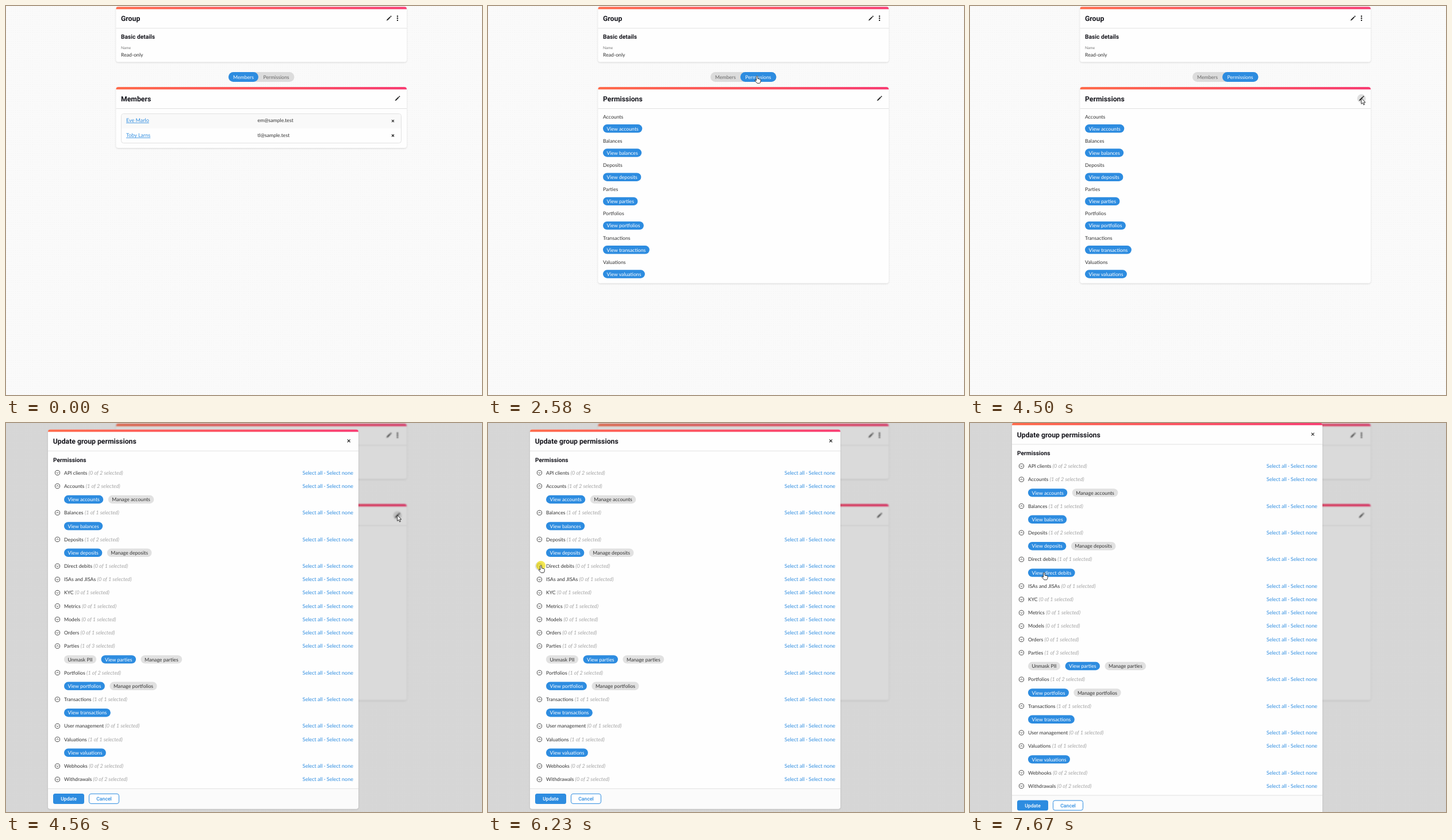
An HTML page with a canvas for the animation above (8000 ms loop, 828 by 677 pixels).

```html
<!DOCTYPE html>
<html lang="en">
<head>
<meta charset="utf-8">
<title>Group permissions</title>
<style>
html, body { margin: 0; width: 100%; height: 100%; overflow: hidden; background: #f9f9f9; }
canvas { display: block; }
</style>
</head>
<body>
<canvas id="stage" width="828" height="677"></canvas>
<script>
const W = 828, H = 677, LOOP = 8000;
const BLUE = '#2d8ce0', LINE = '#e1e1e1', INK = '#333', GREY = '#e1e1e1';
const BODY = '8.7px Lato, sans-serif';
const LINK = '9px Lato, sans-serif';
const COUNT = 'italic 9.1px Lato, sans-serif';
const TITLE = 'bold 12.25px Roboto, sans-serif';
const SUBTITLE = 'bold 10.25px Roboto, sans-serif';

const stage = document.getElementById('stage').getContext('2d');
const page = layer(), backdrop = layer();
let g = stage;

function layer() {
  const canvas = document.createElement('canvas');
  canvas.width = W;
  canvas.height = H;
  return canvas.getContext('2d');
}

for (const c of [stage, page]) c.textRendering = 'geometricPrecision';

backdrop.fillStyle = '#fafafa';
backdrop.fillRect(0, 0, W, H);
backdrop.fillStyle = '#f1f1f1';
for (let y = 1; y < H; y += 3.75)
  for (let x = 1; x < W; x += 3.75) backdrop.fillRect(x, y, 1, 1);

// ---- drawing helpers ----
function text(str, x, y, font = BODY, color = INK, align = 'left') {
  g.font = font;
  g.fillStyle = color;
  g.textAlign = align;
  g.fillText(str, x, y);
  return g.measureText(str).width;
}

function box(x, y, w, h, r, fill, stroke) {
  g.beginPath();
  g.roundRect(x, y, w, h, r);
  if (fill) { g.fillStyle = fill; g.fill(); }
  if (stroke) { g.strokeStyle = stroke; g.lineWidth = 1; g.stroke(); }
}

function disc(x, y, r, fill) {
  g.beginPath();
  g.arc(x, y, r, 0, 7);
  g.fillStyle = fill;
  g.fill();
}

function strokePath(points, color, width = 1) {
  g.beginPath();
  points.forEach(([x, y]) => g.lineTo(x, y));
  g.strokeStyle = color;
  g.lineWidth = width;
  g.stroke();
}

function rule(x, y, w) {
  g.fillStyle = LINE;
  g.fillRect(x, y, w, 1);
}

function cross(x, y, s) {
  strokePath([[x - s, y - s], [x + s, y + s]], '#222', 1.1);
  strokePath([[x + s, y - s], [x - s, y + s]], '#222', 1.1);
}

function pencil(x, y) {
  strokePath([[x - 4.2, y + 4.2], [x - 2.8, y + 2.8]], '#222', 1);
  strokePath([[x - 3.2, y + 3.2], [x + 2.2, y - 2.2]], '#222', 1.9);
  strokePath([[x + 2.7, y - 2.7], [x + 4, y - 4]], '#222', 1.9);
}

function chip(label, x, y, fill, color) {
  g.font = BODY;
  const w = g.measureText(label).width + 13;
  box(x, y - 7.2, w, 14.4, 7.2, fill);
  text(label, x + 6.5, y + 3.2, BODY, color);
  return w;
}

function panel(x, y, w, h, title) {
  g.save();
  g.shadowColor = 'rgba(0,0,0,.14)';
  g.shadowBlur = 3;
  g.shadowOffsetY = 1;
  box(x, y, w, h, 4, '#fefefe');
  g.restore();
  g.save();
  box(x, y, w, h, 4);
  g.clip();
  const bar = g.createLinearGradient(x, 0, x + w, 0);
  bar.addColorStop(0, '#ff6a4a');
  bar.addColorStop(1, '#f83c72');
  g.fillStyle = bar;
  g.fillRect(x, y, w, 4.2);
  g.restore();
  rule(x, y + 37, w);
  text(title, x + 8.7, y + 25, TITLE, '#15151c');
}

// ---- page ----
function drawTabs(permissions) {
  box(387, 115, 114.5, 17, 8.5, '#dcdcdc');
  if (permissions) box(439, 115, 62.5, 17, 8.5, BLUE);
  else box(387, 115, 52, 17, 8.5, BLUE);
  text('Members', 413, 127.3, BODY, permissions ? '#666' : '#fff', 'center');
  text('Permissions', 470, 127.3, BODY, permissions ? '#fff' : '#666', 'center');
}

function drawMembers() {
  panel(191.3, 141, 505.7, 106, 'Members');
  box(200.5, 187.5, 487, 51, 4, '#fefefe', LINE);
  box(201, 188, 486, 25, [4, 4, 0, 0], '#f9f9f9');
  [['Eve Marlo', 'em@sample.test'], ['Toby Larns', 'tl@sample.test']].forEach(([name, mail], i) => {
    const y = 202.3 + i * 25.4;
    const w = text(name, 209, y, LINK, BLUE);
    g.fillRect(209, Math.round(y) + 1, w, 0.8);
    text(mail, 437.5, y, BODY, INK);
    cross(673, y - 2.2, 2);
  });
}

function drawPermissions() {
  panel(191.3, 141, 505.7, 341.5, 'Permissions');
  ['Accounts', 'Balances', 'Deposits', 'Parties', 'Portfolios', 'Transactions', 'Valuations'].forEach((name, i) => {
    const y = 192.5 + i * 42.2;
    text(name, 200, y + 3, BODY);
    chip('View ' + name.toLowerCase(), 200, y + 20.8, BLUE, '#fff');
  });
}

function drawPage(permissions, hover) {
  g.drawImage(backdrop.canvas, 0, 0);
  panel(191.3, 1.3, 505.7, 96.2, 'Group');
  pencil(666.2, 21.3);
  for (const y of [17.7, 21.3, 24.9]) disc(681, y, 1.2, '#222');
  text('Basic details', 200, 57.3, SUBTITLE, '#15151c');
  text('Name', 200, 74.8, '6.6px Lato, sans-serif', '#777');
  text('Read-only', 200, 87.5);
  drawTabs(permissions);
  if (permissions) drawPermissions();
  else drawMembers();
  if (hover) disc(681, 161, 7.5, '#dedede');
  pencil(681, 160.8);
}

// ---- dialog ----
// name, number selected, options (a leading * marks a selected one)
const GROUPS = [
  ['API clients', 2], ['Accounts', 2, '*View accounts', 'Manage accounts'],
  ['Balances', 1, '*View balances'], ['Deposits', 2, '*View deposits', 'Manage deposits'],
  ['Direct debits', 1], ['ISAs and JISAs', 1], ['KYC', 1], ['Metrics', 1], ['Models', 1], ['Orders', 1],
  ['Parties', 3, 'Unmask PII', '*View parties', 'Manage parties'],
  ['Portfolios', 2, '*View portfolios', 'Manage portfolios'],
  ['Transactions', 1, '*View transactions'], ['User management', 1],
  ['Valuations', 1, '*View valuations'], ['Webhooks', 2], ['Withdrawals', 2]
];

function mix(a, b, k) {
  return `rgb(${a.map((v, i) => Math.round(v + (b[i] - v) * k))})`;
}

function drawGroupHead(name, count, total, open, focus, y) {
  if (focus) disc(89.5, y, 7.6, '#dedede');
  g.beginPath();
  g.arc(89.5, y, 4.1, 0, 7);
  g.strokeStyle = INK;
  g.lineWidth = 0.9;
  g.stroke();
  const d = open ? -1 : 1;
  strokePath([[87.5, y - 0.8 * d], [89.5, y + 1.2 * d], [91.5, y - 0.8 * d]], INK, 0.9);
  const w = text(name, 101, y + 3, BODY);
  text(`(${count} of ${total} selected)`, 101 + w + 2.4, y + 3, COUNT, '#a3a3a3');
  text('Select all · Select none', 604, y + 3, LINK, BLUE, 'right');
}

function drawDialog({ expanded, chosen, focus }) {
  const pitch = 23.2, top = expanded ? -0.4 : 11.2;
  const height = expanded ? 683.4 : 660.2, foot = top + height - 35.5;
  panel(73, top, 540, height, 'Update group permissions');
  cross(596.3, top + 19.9, 2.4);
  text('Permissions', 82, top + 56.3, SUBTITLE, '#15151c');

  let y = top + 75.4;
  for (const [name, total, ...options] of GROUPS) {
    const direct = name === 'Direct debits';
    const open = options.length > 0 || (direct && expanded);
    const count = direct ? +(chosen > 0) : options.filter(o => o[0] === '*').length;
    drawGroupHead(name, count, total, open, direct && focus, y);
    y += pitch;
    if (!open) continue;
    let x = 101;
    for (const option of options) {
      const on = option[0] === '*';
      x += chip(option.replace('*', ''), x, y, on ? BLUE : GREY, on ? '#fff' : INK) + 8.5;
    }
    if (direct) chip('View direct debits', x, y,
      mix([225, 225, 225], [45, 140, 224], chosen), mix([51, 51, 51], [255, 255, 255], chosen));
    y += pitch;
  }

  box(73, foot, 540, 35.5, [0, 0, 4, 4], '#fbfbfb');
  rule(73, foot, 540);
  box(82, foot + 9, 54, 18, 3.5, BLUE);
  text('Update', 109, foot + 21.4, '500 8.7px Roboto, sans-serif', '#fff', 'center');
  box(144.5, foot + 9.5, 52, 17, 3.5, '#fff', BLUE);
  text('Cancel', 170.5, foot + 21.4, '500 8.7px Roboto, sans-serif', BLUE, 'center');
}

// ---- pointer ----
const HAND = new Path2D('M-1.2 1Q0-1 1.2 1V5l4 .9q1.5.4 1.3 2l-.7 3.4q-.3 1.6-1.6 1.6H.2L-3.6 8.6q-.7-1.3.6-1.4l1.8 1.1Z');
const ARROW = new Path2D('M0 0V10L2.4 7.9 4 11.6 5.7 10.9 4.1 7.3H7.2Z');
const ENTER = 190, ARRIVE = 1520;
// time, x, y
const STOPS = [
  [1520, 464, 118.5], [1860, 464, 118.5], [2060, 468, 121.5],
  [3050, 468, 121.5], [3700, 688, 166], [3910, 678.5, 163], [4100, 680.7, 160.5],
  [4830, 680.7, 160.5], [5740, 101, 245], [5950, 92, 247.7],
  [6615, 92, 247.7], [6880, 128.8, 260], [LOOP, 128.8, 260]
];
const CLICKS = [[2450, 2580], [4430, 4500], [6230, 6290], [7480, 7540]];

const smooth = k => k * k * (3 - 2 * k);

function pointerAt(t) {
  if (t < ARRIVE) {
    const u = smooth((t - ENTER) / (ARRIVE - ENTER)), v = 1 - u;
    const bend = (a, b, c) => v * v * a + 2 * u * v * b + u * u * c;
    return [bend(794, 813, 464), bend(663, 93, 118.5)];
  }
  const i = STOPS.findIndex(s => s[0] > t);
  const [t0, x0, y0] = STOPS[i - 1], [t1, x1, y1] = STOPS[i];
  const k = smooth((t - t0) / (t1 - t0));
  return [x0 + (x1 - x0) * k, y0 + (y1 - y0) * k];
}

function isHand(x, y, t) {
  const within = (l, top, r, b) => x >= l && x <= r && y >= top && y <= b;
  if (t < 4560) return within(387, 115, 502, 133);
  if (t < 6290) return within(82, 241, 98, 257) || within(176, 219, 253, 233);
  return within(101, 253, 182, 268);
}

function drawPointer(t) {
  if (t < ENTER) return;
  const [x, y] = pointerAt(t);
  if (CLICKS.some(([a, b]) => t >= a && t < b)) disc(x, y + 0.5, 8.2, 'rgba(242,226,30,.75)');
  g.save();
  g.translate(x, y);
  const shape = isHand(x, y, t) ? HAND : ARROW;
  g.fillStyle = '#fff';
  g.fill(shape);
  g.strokeStyle = '#222';
  g.lineWidth = 0.9;
  g.lineJoin = 'round';
  g.stroke(shape);
  g.restore();
}

// ---- scene ----
function draw(t) {
  const modal = t >= 4560;
  const hover = t >= 3580 && t < 4890;
  g = page;
  drawPage(t >= 2580, hover);
  g = stage;
  g.drawImage(page.canvas, 0, 0);
  if (modal) {
    g.filter = 'blur(1.2px)';
    g.drawImage(page.canvas, 0, 0);
    g.filter = 'none';
    g.fillStyle = 'rgba(0,0,0,.14)';
    g.fillRect(0, 0, W, H);
    drawDialog({
      expanded: t >= 6290,
      focus: t >= 5820 && t < 7540,
      chosen: Math.min(1, Math.max(0, (t - 7500) / 150))
    });
  }
  drawPointer(t);
}

const start = performance.now();
function tick() {
  draw((performance.now() - start) % LOOP);
  requestAnimationFrame(tick);
}
tick();
</script>
</body>
</html>
```
